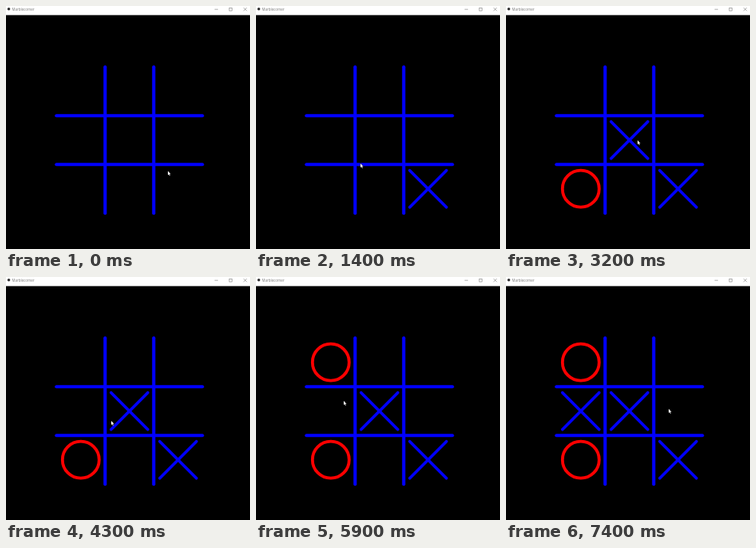
Recreate the animation shown at these times as an HTML page with a canvas. Size 306 by 304 pixels, loop 8000 ms.

```html
<!DOCTYPE html>
<html lang="en">
<head>
<meta charset="utf-8">
<title>Noughts and crosses</title>
<style>
html, body { margin: 0; width: 306px; height: 304px; overflow: hidden; background: #000; }
canvas { display: block; }
</style>
</head>
<body>
<canvas id="stage" width="306" height="304"></canvas>
<script>
const ctx = document.getElementById('stage').getContext('2d');
const LOOP = 8000, STEP = 100;
const BLUE = '#0000ff', RED = '#ff0000', GREY = '#777';

// Board geometry: centre, cell size, mark radius
const CX = 154.8, CY = 167.7, CELL = 61, R = 23;

// Players alternate; each turn is a time and a cell, counted row by row
const turns = [[500, 8], [2000, 6], [3200, 4], [5000, 0], [6700, 3]];

// Pointer glides: start, end, x, y. It rests in between.
const home = [203, 206.5];
const glides = [
  [0, 200, 205, 208],
  [1000, 1400, 131, 197],
  [1400, 1600, 113, 209],
  [2500, 2800, 165, 168],
  [3600, 3900, 157, 212],
  [4200, 4300, 132, 180],
  [4300, 4500, 108, 126],
  [5000, 5400, 106, 98],
  [5500, 5900, 110, 155],
  [6900, 7400, 204, 165]
];

function pointerAt(t) {
  let [x, y] = home;
  for (const [from, to, gx, gy] of glides) {
    const k = Math.min(1, Math.max(0, (t - from) / (to - from)));
    x += (gx - x) * k;
    y += (gy - y) * k;
  }
  return [x, y];
}

function line(x0, y0, x1, y1, width, color) {
  ctx.lineWidth = width;
  ctx.strokeStyle = color;
  ctx.beginPath();
  ctx.moveTo(x0, y0);
  ctx.lineTo(x1, y1);
  ctx.stroke();
}

function cross(x, y, r, width, color) {
  line(x - r, y - r, x + r, y + r, width, color);
  line(x - r, y + r, x + r, y - r, width, color);
}

function ring(x, y, r, width, color) {
  ctx.lineWidth = width;
  ctx.strokeStyle = color;
  ctx.beginPath();
  ctx.arc(x, y, r, 0, Math.PI * 2);
  ctx.stroke();
}

function drawTitleBar() {
  ctx.fillStyle = '#fff';
  ctx.fillRect(0, 0, 306, 11.4);
  ctx.fillStyle = '#333';
  ctx.beginPath();
  ctx.arc(3.5, 3.8, 1.8, 0, Math.PI * 2);
  ctx.fill();
  ctx.fillStyle = GREY;
  ctx.font = '4.4px "Open Sans", sans-serif';
  ctx.fillText('Marblecorner', 7.6, 5.6);
  line(262, 4.2, 265.5, 4.2, 0.6, GREY);
  ctx.strokeRect(280, 2.4, 3.6, 3.6);
  cross(300, 4.2, 1.8, 0.6, GREY);
}

function drawGrid() {
  const reach = CELL * 1.5;
  for (const side of [-1, 1]) {
    const x = CX + side * CELL / 2, y = CY + side * CELL / 2;
    line(x, CY - reach, x, CY + reach, 4.1, BLUE);
    line(CX - reach, y, CX + reach, y, 4.1, BLUE);
  }
}

function drawMarks(t) {
  turns.forEach(([at, cell], i) => {
    if (t < at) return;
    const x = CX + (cell % 3 - 1) * CELL;
    const y = CY + (Math.floor(cell / 3) - 1) * CELL;
    if (i % 2) ring(x, y, R, 3.8, RED);
    else cross(x, y, R, 3.7, BLUE);
  });
}

function drawPointer(x, y) {
  const arrow = new Path2D('M0 0V5L1.2 4L2 6L2.8 5.6L2 3.7H3.6Z');
  ctx.save();
  ctx.translate(x, y);
  ctx.lineWidth = 0.7;
  ctx.strokeStyle = '#000';
  ctx.stroke(arrow);
  ctx.fillStyle = '#fff';
  ctx.fill(arrow);
  ctx.restore();
}

function draw(t) {
  ctx.fillStyle = '#000';
  ctx.fillRect(0, 0, 306, 304);
  ctx.lineCap = 'round';
  drawTitleBar();
  drawGrid();
  drawMarks(t);
  drawPointer(...pointerAt(t));
}

let start;
function tick(now) {
  start ??= now;
  const t = (now - start) % LOOP;
  draw(Math.floor(t / STEP) * STEP);
  requestAnimationFrame(tick);
}
draw(0);
requestAnimationFrame(tick);
</script>
</body>
</html>
```
